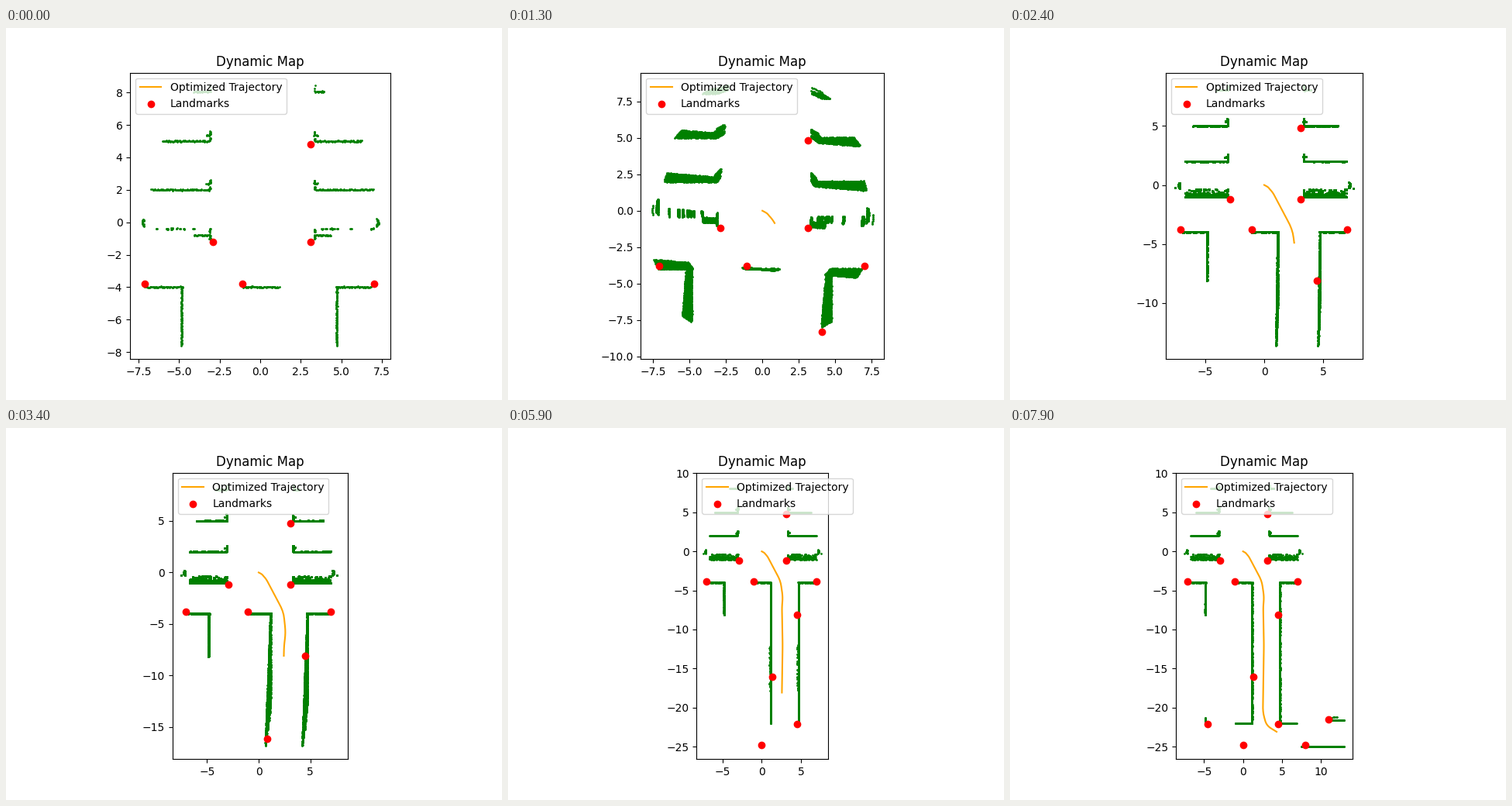
Animation, 640 px wide and 480 px high, one loop 8000 ms. Source, as a matplotlib script:

```python
import numpy as np
import matplotlib.pyplot as plt
from matplotlib.animation import FuncAnimation

FRAMES, STEP = 80, 100
END = FRAMES * STEP
TURN_FIX, BEND_FIX = 1700, 4000   # moments (ms) when the drift is corrected
FAR_END = 5800                    # the far wall comes into view
rng = np.random.default_rng(4)

CORNERS = np.array([(0, 0), (.55, -.3), (2.4, -3.8), (2.7, -5.9), (2.58, -7),
                    (2.67, -12), (2.54, -20.6), (3, -22.3), (4.3, -23.1)])
MARKS = np.array([(3.1, 4.8), (-2.9, -1.2), (3.1, -1.2), (-7.1, -3.8), (-1.08, -3.8),
                  (7.02, -3.8), (4.5, -8.1), (1.33, -16.1), (4.5, -22.1), (0, -24.8),
                  (8.02, -24.75), (-4.5, -22.1), (10.9, -21.5)])
SEEN = np.array([0] * 6 + [800, 3200, 5300, FAR_END, 6500, 7100, 7300])


def turn_error(t):
    return 0.085 * np.clip((t - 300) / 1000, 0, 1) * (t < TURN_FIX)


def bend_error(t):
    return 2.27e-5 * max(t - TURN_FIX, 0) * (t < BEND_FIX)


LOW_T, LOW_Y = [0, 1300, 2400, 3400, 4600, 5700], [7.63, 9.28, 13.66, 16.84, 21.8, 22.1]
HIGH_T = [0, 1300, 2400, 3400, 4000, 6300, 6800, 7900]
HIGH_X = [7.29, 7.56, 7.58, 7.88, 7.64, 7.7, 11.36, 13]


def y_low(t):
    return -np.interp(t, LOW_T, LOW_Y) if t < FAR_END else -24.93


def x_high(t):
    return np.interp(t, HIGH_T, HIGH_X)


cloud = []


def add(x, y, born=0, die=END, noise=0.035):
    x, y, born, die = np.broadcast_arrays(x, y, born, die)
    x = x + rng.uniform(-noise, noise, x.shape)
    y = y + rng.uniform(-noise, noise, y.shape)
    cloud.append(np.column_stack([x, y, born, die]))


def line(x0, y0, x1, y1, born=0, die=END):
    n = int(np.hypot(x1 - x0, y1 - y0) / 0.04) + 2
    add(np.linspace(x0, x1, n), np.linspace(y0, y1, n), born, die)


def wall(x, low, start=0):
    """Vertical wall, revealed downwards with the mapped area."""
    y = np.arange(-4, low, -0.04)
    reach = np.maximum(np.interp(-y, LOW_Y, LOW_T), TURN_FIX)
    add(x, y, np.where(y > -7.63, start, reach))


def far_wall(y, x0, x1, start, die=END):
    """Horizontal wall, revealed to the right with the mapped area."""
    x = np.arange(x0, x1, 0.04)
    add(x, y, np.maximum(np.interp(x, HIGH_X, HIGH_T), start), die)


def shelf(side, x, y, length):
    line(x, y, x + side * length, y)
    if y > 8:
        add(x, y + np.array([0.15, 0.35]))
        return
    line(x, y + 0.4, x, y + 0.62)
    line(x, y + 0.05, x, y + 0.18)
    line(x, y + 0.37, x + side * 0.2, y + 0.37)


def rack(side, x):
    """Sparse dots at first, filled in by later passes."""
    for gap in rng.uniform(0.4, 3.6, 9):
        line(x + side * gap, -0.4, x + side * (gap + 0.06), -0.4)
    line(x, -0.4, x, -0.62)
    line(x, -0.8, x, -1.02)
    line(x, -0.8, x + side, -0.8)
    line(x, -1, x + side * 3.6, -1, TURN_FIX)
    add(x + side * rng.uniform(0, 3.6, 150), -0.4 - 0.6 * rng.power(1.8, 150),
        rng.uniform(TURN_FIX, 2400, 150))


def build():
    for side, x in ((-1, -3.1), (1, 3.35)):
        for y, length in ((8.05, 0.8 - 0.2 * side), (5, 2.9), (2, 3.6)):
            shelf(side, x, y, length)
        rack(side, x)
        line(side * 7.18, -0.25, side * 7.18, -0.12)
        line(side * 7.18, 0.08, side * 7.18, 0.22)
        line(side * 7.27, -0.12, side * 7.27, 0.12)
        add(side * 7.56, -0.25, 1200)

    for x0, x1 in ((-7.1, -4.75), (-1.05, 1.15), (4.65, 6.8)):
        line(x0, -3.99, x1, -3.99)
    wall(-4.85, -8.2)
    wall(1.15, -22.1, 1500)
    wall(4.72, -22.1)
    for x in (1.02, 4.58):
        add(x, rng.uniform(-18, -12, 40), FAR_END, 7200, 0.06)

    for x0, x1 in ((-1, 1.2), (4.6, 6.85)):
        line(x0, -22, x1, -22, 7100)
    line(-4.82, -21.3, -4.82, -21.75, 7100)
    far_wall(-24.75, 7.55, 11.4, 6400, 7200)
    far_wall(-24.95, 7.55, 10.2, 6600, 7200)
    far_wall(-25, 7.45, 13, 7200)
    far_wall(-21.6, 11, 13, 7300)
    add(np.arange(11.05, 12.2, 0.15), -21.25, 7400)
    return np.vstack(cloud)


def drive():
    """Robot position per frame: rounded corners, slower while turning."""
    dist = np.append(0, np.cumsum(np.hypot(*np.diff(CORNERS, axis=0).T)))
    s = np.interp(np.arange(FRAMES) * STEP, [300, 1300, 2400, 3400, 6800, 7900],
                  [0, 1.25, 5.7, 8.9, 22.5, dist[-1]])
    reach = np.minimum(0.6, np.minimum(s, dist[-1] - s))
    near = s + reach * np.linspace(-1, 1, 9)[:, None]
    return np.column_stack([np.interp(near, dist, c).mean(axis=0) for c in CORNERS.T])


def turn(xy, angle):
    c, s = np.cos(angle), np.sin(angle)
    return xy @ np.array([[c, -s], [s, c]])


def bend(xy, amount):
    x, y = xy.T
    shift = np.where((y < -4) & (x > 0), amount * (y + 4), 0)
    return np.column_stack([x + shift, y])


POINTS = build()
PATH = drive()


def scan(t):
    """Visible points; drift smears them over the recent poses."""
    xy = POINTS[(POINTS[:, 2] <= t) & (t < POINTS[:, 3]), :2]
    angle, skew = turn_error(t), bend_error(t)
    if angle > 0:
        return np.vstack([turn(xy, a) for a in np.linspace(0, angle, 9)])
    if skew > 0:
        return np.vstack([bend(xy[xy[:, 1] > y_low(t) + 4 * (1 - f)], skew * f)
                          for f in np.linspace(0, 1, 6)])
    return xy


def landmarks(t):
    xy = MARKS.copy()
    xy[6:7] = turn(xy[6:7], 0.6 * turn_error(t))
    xy[7:8] = bend(xy[7:8], bend_error(t))
    return xy[SEEN <= t]


fig, ax = plt.subplots(figsize=(6.4, 4.8), dpi=100)
ax.set_aspect("equal", adjustable="box")
ax.set_title("Dynamic Map")
dots = ax.scatter([], [], s=1, color="green")
track, = ax.plot([], [], color="orange", label="Optimized Trajectory")
marks = ax.scatter([], [], color="red", label="Landmarks")
ax.legend(loc="upper left")


def limits(low, high):
    pad = 0.05 * (high - low)
    return low - pad, high + pad


def draw(i):
    t = i * STEP
    dots.set_offsets(scan(t))
    marks.set_offsets(landmarks(t))
    trail = bend(PATH[:i + 1], bend_error(t)) if t > 300 else PATH[:0]
    track.set_data(*trail.T)
    ax.set_xlim(limits(-7.29 - 0.29 * min(t / 1300, 1), x_high(t)))
    ax.set_ylim(limits(y_low(t), 8.42 + 1.8 * turn_error(t)))
    return dots, track, marks


anim = FuncAnimation(fig, draw, frames=FRAMES, interval=STEP, repeat=True, repeat_delay=0)
plt.show()
```
